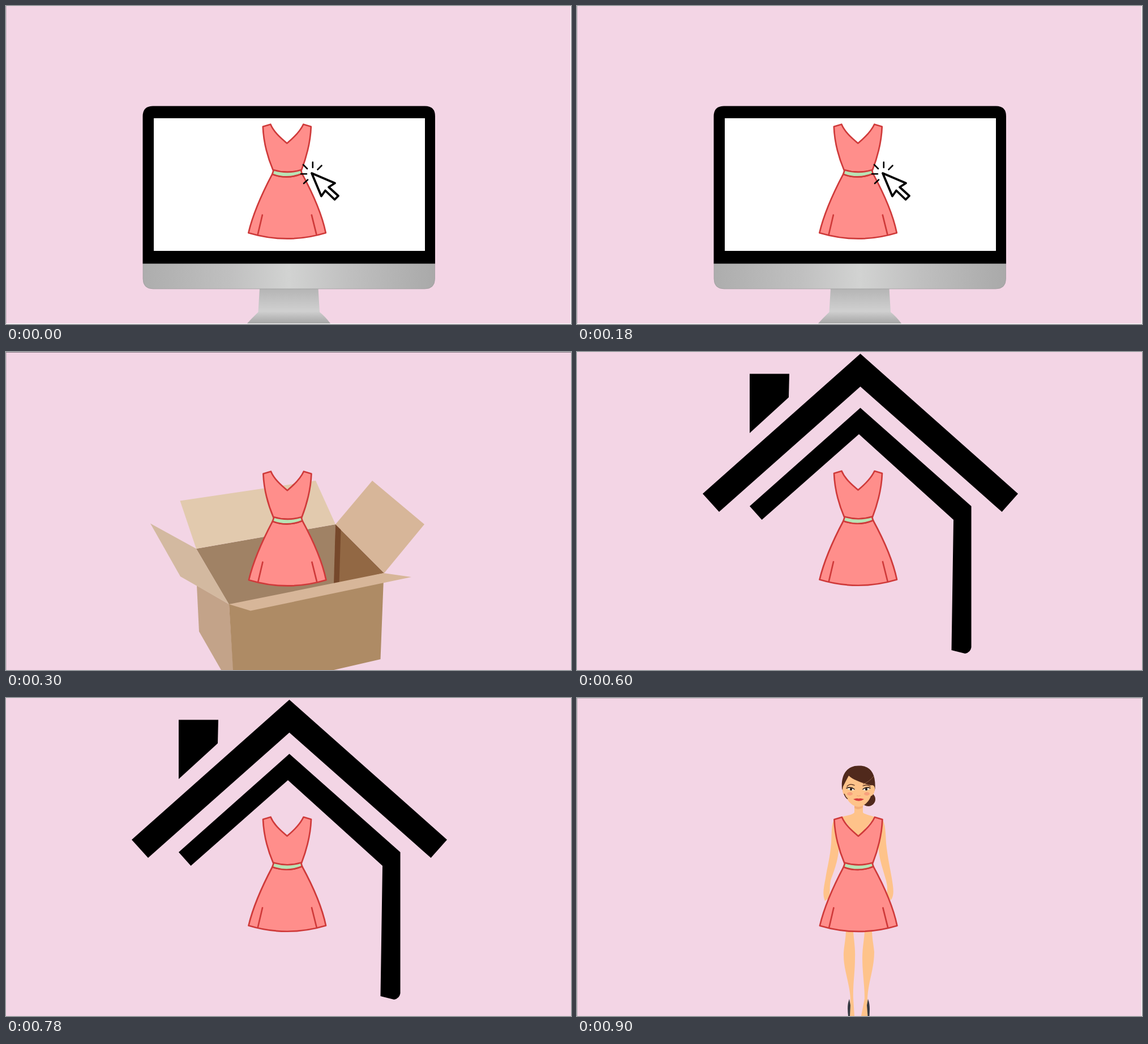
Recreate the animation shown at these times as an HTML page. Size 998 by 561 pixels, loop 1200 ms.

```html
<!DOCTYPE html>
<html lang="en">
<head>
<meta charset="utf-8">
<title>Dress delivery</title>
<style>
  html, body { margin: 0; width: 100%; height: 100%; overflow: hidden; background: #f3d5e5; }
  svg { display: block; width: 998px; height: 561px; }
  .scene { opacity: 0; }
</style>
</head>
<body>
<svg viewBox="0 0 998 561">
  <defs>
    <linearGradient id="chin">
      <stop offset="0" stop-color="#adadad"/>
      <stop offset=".3" stop-color="#c0c0c0"/>
      <stop offset=".5" stop-color="#d2d3d2"/>
      <stop offset=".7" stop-color="#c0c0c0"/>
      <stop offset="1" stop-color="#a9a9a9"/>
    </linearGradient>
    <linearGradient id="stand" x2="0" y2="1">
      <stop offset="0" stop-color="#b4b4b4"/>
      <stop offset=".65" stop-color="#d0d0d0"/>
      <stop offset="1" stop-color="#a6a6a6"/>
    </linearGradient>
    <g id="dress" stroke="#cf3a3a" stroke-width="2.7" stroke-linecap="round" stroke-linejoin="round">
      <path fill="#ff8e8b" d="M454 214L467.5 210C473 223 484 233 496.5 243.5C508 234 519 224 525.5 210L539 214C538 242 532 265 522 291Q497 298 472 291C461 265 455 240 454 214Z"/>
      <path fill="#ff8e8b" d="M470.5 298Q497 308 523 297C541 330 558 368 565 401.5Q497 422 428.5 401.5C436 370 452 333 470.5 298Z"/>
      <path fill="#b9e3b5" d="M473 290.5Q497 298 521 290.5L523 297Q497 308 470.5 298Z"/>
      <path fill="none" d="M453 370L445 404M540 370L548.5 404"/>
    </g>
  </defs>

  <rect width="998" height="561" fill="#f3d5e5"/>

  <g class="scene">
    <path fill="#c5b3be" d="M0 0h1v561h-1z"/>
    <path fill="url(#stand)" d="M448 498H551.5L554 540Q563 547 573 560H426Q436 549 445.500 540Z"/>
    <path fill="url(#chin)" stroke="#999" stroke-width=".7" d="M242 454H757.500V481Q757.500 499 739.500 499H260Q242 499 242 481Z"/>
    <path d="M241.500 454.500V194.500Q241.500 176.500 259.500 176.500H740Q758 176.500 758 194.500V454.500Z"/>
    <rect x="261" y="198" width="479" height="234" fill="#fff"/>
    <use href="#dress" x="-.2" y="-1.300"/>
    <g stroke="#000" stroke-linecap="round" stroke-linejoin="round">
      <path stroke-width="2.600" d="M541.800 275.500V285M557.500 281.500L550.500 288.500M525 280L532 287M521 296.200H531M533 306.500L526 313"/>
      <path fill="#fff" stroke-width="3.800" d="M540 295L581 312.500L570 319.500L587 335L580.500 341.500L564 325.500L557 335.500Z"/>
    </g>
    <path fill="#fff" d="M0 560h998v1h-998zM997 0h1v561h-1z"/>
  </g>

  <g class="scene">
    <path fill="#c5b3be" d="M0 0h1v561h-1z"/>
    <path fill="#807680" d="M0 0h998v1h-998z"/>
    <path fill="#a08265" d="M336 347L582 304L579 420L394 446Z"/>
    <path fill="#926844" d="M582 304L668 390L579 410Z"/>
    <path fill="#76482b" d="M582 304L591.500 313L588.500 410H579Z"/>
    <path fill="#e2caae" d="M307.500 262.500L547 227L582 304L336 347Z"/>
    <path fill="#d7b699" d="M582 304L647 227L739 304L668 390Z"/>
    <path fill="#c3a389" d="M337 412L394 445L401.500 561H380L341 493Z"/>
    <path fill="#d3b9a0" d="M255 302.500L336 347L394 445L308 396Z"/>
    <path fill="#ae8b65" d="M394 445L667 400L661.500 542L579 561H401Z"/>
    <use href="#dress" x=".4" y=".7"/>
    <path fill="#d7b699" d="M394 445L667 390L716 397L432 456.500Z"/>
  </g>

  <g class="scene">
    <path d="M305 38.500H375L374 80L305 143Z"/>
    <path d="M500.500 3L779 250L750.500 282L500.500 61L251 282L222 250Z"/>
    <path d="M500.500 98.500L696.500 272V521Q695 530 685.500 532L661.500 526L665 296L498 145L326.500 296L305 272Z"/>
    <use href="#dress"/>
  </g>

  <g class="scene">
    <path fill="#c5b3be" d="M0 0h1v561h-1zM0 0h998v1h-998z"/>
    <path fill="#fff" d="M997 1h1v560h-1z"/>
    <g fill="#fec38a">
      <path d="M455 214C449 222 450 238 449 256C447 282 442 298 439 318C436 334 433 346 438 358L446 352C447 340 446 333 448 322C457 297 463 282 463 250Z"/>
      <path d="M539 214C545 222 545 238 546 256C549 284 553 299 556 318C559 336 561 348 554 357L547 345C549 337 548 332 546 322C539 296 532 282 532 250Z"/>
      <path d="M475 408H488C488 422 492 438 491 459C491 486 487 506 488 530L490 561H480L483 530C481 500 470 477 471 450C472 435 475 424 475 408Z"/>
      <path d="M508 408H521C521 424 524 435 525 448C525 478 514 502 513 530L516 561H502L508 530C508 506 504 484 504 459C504 438 508 424 508 408Z"/>
    </g>
    <path fill="#353841" d="M481 531C477 541 478 551 479 561H482L483 542ZM514 531C518 541 517 551 516.500 561H513.500L512 542Z"/>
    <circle cx="514.500" cy="178.500" r="12.500" fill="#50291c"/>
    <path fill="#fec38a" d="M490 182H505V202C509 206 518 207 526 210L497 246L467 210C476 207 485 207 490 202Z"/>
    <path fill="#f5ad78" d="M490 188Q498 195 505 188V193Q497 199 490 194Z"/>
    <path fill="#50291c" d="M468 160C466 135 477 119 498 119.500C519 119 528 134 526.500 160L523 170H472Z"/>
    <path fill="#fec38a" d="M470 156Q475 146 480 137C488 145 507 151 519 154Q525 153 526 159C526 167 523 172 519 173C516 183 506 192 497.500 192C488 192 478 183 475 173C469 171 468 163 470 156Z"/>
    <path fill="none" stroke="#8e6044" d="M505 152Q516 148 524 138"/>
    <g fill="#f8a17d">
      <ellipse cx="482" cy="169" rx="5" ry="3"/>
      <ellipse cx="512" cy="169" rx="5" ry="3"/>
    </g>
    <path fill="none" stroke="#50291c" stroke-width="1.300" stroke-linecap="round" d="M477 156Q482 150 490 154M505 155Q512 152 518 156"/>
    <path fill="#fff" d="M478 160Q484 157 490 162Q484 165 478 160ZM505 162Q511 157 517 160Q511 165 505 162Z"/>
    <path fill="none" stroke="#29201e" stroke-width="1.500" stroke-linecap="round" d="M476 159Q484 156 490 161M505 161Q511 156 518 159"/>
    <g fill="#29201e">
      <circle cx="484" cy="161" r="2.200"/>
      <circle cx="511" cy="161" r="2.200"/>
    </g>
    <path fill="none" stroke="#eea673" d="M494 172Q497.500 174 501 172"/>
    <path fill="#d73a3d" d="M488 178.500Q494 176 497.500 177.500Q501 176 507 178.500Q498 185 488 178.500Z"/>
    <path fill="none" stroke="#50291c" stroke-width="1.500" d="M472 169Q474 175 478 178"/>
    <use href="#dress" x=".4" y=".2"/>
  </g>
</svg>
<script>
  const HOLD = 300;
  const scenes = [...document.querySelectorAll('.scene')];
  const loop = HOLD * scenes.length;

  // Each scene holds one equal slot of the loop, with hard cuts.
  scenes.forEach((scene, i) => {
    const steps = [...scenes, scenes[0]].map((s, k) => ({
      opacity: k % scenes.length === i ? 1 : 0,
      offset: k / scenes.length,
      easing: 'steps(1, end)'
    }));
    scene.animate(steps, { duration: loop, iterations: Infinity }).startTime = 0;
  });
</script>
</body>
</html>
```
